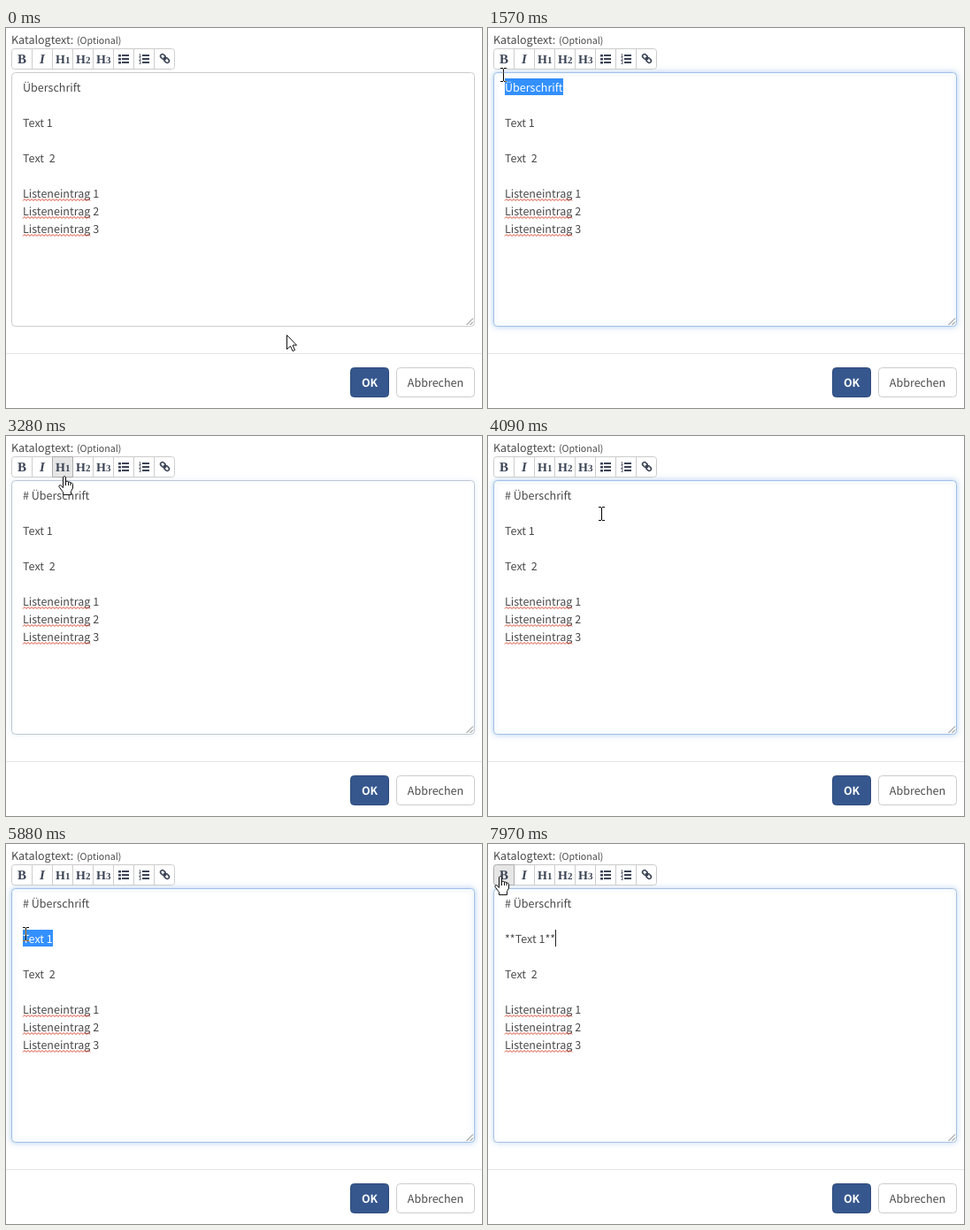
Animation of 538 by 430 pixels, one loop 8000 ms. Source, as an HTML page with a canvas:

```html
<!DOCTYPE html>
<html lang="de">
<head>
<meta charset="utf-8">
<title>Katalogtext</title>
<style>
html, body { margin: 0; width: 100%; height: 100%; overflow: hidden; background: #fff; }
canvas { display: block; }
</style>
</head>
<body>
<canvas id="stage" width="538" height="430"></canvas>
<script>
const ctx = document.getElementById('stage').getContext('2d');
const LOOP = 8000;
const SANS = '"Noto Sans CJK JP", "Noto Sans CJK SC", "Noto Sans", sans-serif';
const SERIF = '"Liberation Serif", serif';
const BODY = `12.54px ${SANS}`;
const INK = '#4a4a4a', ICON = '#3b4455';
const LEFT = 19;

// Pointer stops: time, x, y
const PATH = [
  [190, 317, 347], [980, 95, 69], [1360, 95, 69], [1600, 14, 52],
  [2000, 14, 52], [2550, 65, 44], [2730, 66, 45], [3820, 66, 45],
  [4090, 128, 88], [4350, 88, 107], [4600, 58, 102], [5410, 58, 102],
  [5880, 22, 102], [6380, 22, 102], [6890, 14, 36]
];

const ARROW = new Path2D('M.5 .5V16.5L4.5 13L7 18.5L9.5 17.5L7 12H11.5Z');
const HAND = new Path2D('M-1.5 1.5Q0 -.5 1.5 1.5V6.5Q3.3 5.5 4.5 7Q6 6.3 7 8Q9 7.6 9.5 9.5V14L7.5 17.5V21.5H-1.5V18.5L-6 12.5Q-6.5 10.5 -4.5 10.5L-1.5 13.5Z');
const KNUCKLES = new Path2D('M1.5 6V11M4.5 7V11M7 8V11');
const IBEAM = new Path2D('M-3 -8h3v1h1v-1h3v1h-3v14h3v1h-3v-1h-1v1h-3v-1h3v-14h-3Z');

const clamp = v => Math.max(0, Math.min(1, v));
const smooth = v => v * v * (3 - 2 * v);
const between = (t, a, b) => t >= a && t < b;
const mix = (a, b, k) => `rgb(${a.map((v, i) => Math.round(v + (b[i] - v) * k))})`;

function pointerAt(t) {
  const next = PATH.findIndex(p => p[0] > t);
  if (next === 0) return PATH[0].slice(1);
  if (next < 0) return PATH[PATH.length - 1].slice(1);
  const [t0, x0, y0] = PATH[next - 1], [t1, x1, y1] = PATH[next];
  const k = smooth((t - t0) / (t1 - t0));
  return [Math.round(x0 + (x1 - x0) * k), Math.round(y0 + (y1 - y0) * k)];
}

function text(str, x, y, font = BODY, color = INK, align = 'left') {
  ctx.font = font;
  ctx.fillStyle = color;
  ctx.textAlign = align;
  ctx.fillText(str, x, y);
}

function box(x, y, w, h, r, fill, stroke) {
  ctx.beginPath();
  ctx.roundRect(x + .5, y + .5, w - 1, h - 1, r);
  ctx.fillStyle = fill;
  ctx.fill();
  ctx.strokeStyle = stroke;
  ctx.lineWidth = 1;
  ctx.stroke();
}

function width(str) {
  ctx.font = BODY;
  return ctx.measureText(str).width;
}

function rows(draw) {
  for (let i = 0; i < 3; i++) draw(31 + i * 4, i);
}

function chainLink() {
  ctx.save();
  ctx.translate(179.5, 34.5);
  ctx.rotate(Math.PI / 4);
  ctx.strokeStyle = ICON;
  ctx.lineWidth = 1.6;
  ctx.beginPath();
  ctx.roundRect(-6, -2.2, 6, 4.4, 2.2);
  ctx.roundRect(0, -2.2, 6, 4.4, 2.2);
  ctx.moveTo(-2, 0);
  ctx.lineTo(2, 0);
  ctx.stroke();
  ctx.restore();
}

function toolbar(hover, pressed) {
  box(6, 23, 185, 24, 3, '#fff', '#ccc');
  ctx.fillStyle = '#ccc';
  for (let i = 1; i < 8; i++) ctx.fillRect(6 + i * 23, 23, 1, 24);
  if (hover >= 0) {
    box(6 + hover * 23, 23, 24, 24, hover ? 0 : [3, 0, 0, 3], pressed ? '#d4d4d4' : '#e6e6e6', '#adadad');
  }
  text('B', 18, 40, `bold 15px ${SERIF}`, ICON, 'center');
  text('I', 41, 40, `italic bold 15px ${SERIF}`, ICON, 'center');
  for (let i = 1; i < 4; i++) {
    text('H', 33 + i * 23, 40, `bold 14px ${SERIF}`, ICON);
    text(i, 44 + i * 23, 40, `bold 11px ${SERIF}`, ICON);
  }
  rows((y, i) => {
    ctx.fillStyle = ICON;
    ctx.fillRect(127, y - 1, 3, 2.5);
    ctx.fillRect(131, y - 1, 8, 2);
    ctx.fillRect(154, y - 1, 8, 2);
    text(i + 1, 150, y + 2, `bold 5px ${SANS}`, ICON);
  });
  chainLink();
}

function textarea(focus) {
  ctx.save();
  ctx.shadowColor = `rgba(110, 165, 225, ${.5 * focus})`;
  ctx.shadowBlur = 6;
  box(6, 50, 524, 288, 4, '#fff', mix([204, 204, 204], [160, 192, 230], focus));
  ctx.restore();
  ctx.strokeStyle = '#777';
  ctx.beginPath();
  ctx.moveTo(520.5, 336);
  ctx.lineTo(528, 328.5);
  ctx.moveTo(524.5, 336);
  ctx.lineTo(528, 332.5);
  ctx.stroke();
}

function squiggle(y, length) {
  ctx.beginPath();
  for (let x = 0; x <= length; x += 2) ctx.lineTo(LEFT + x, y + (x % 4 ? 0 : 2));
  ctx.strokeStyle = '#d8452f';
  ctx.lineWidth = 1;
  ctx.stroke();
}

// Selects from the nearest letter gap at pointer x to the end of the line
function selection(str, baseline, x, color) {
  const gaps = [...str, ''].map((_, i) => LEFT + width(str.slice(0, i)));
  const start = gaps.reduce((a, b) => Math.abs(b - x) < Math.abs(a - x) ? b : a);
  const end = gaps[gaps.length - 1];
  if (start >= end) return;
  ctx.save();
  ctx.beginPath();
  ctx.rect(Math.round(start), baseline - 15, Math.round(end) - Math.round(start), 19);
  ctx.clip();
  ctx.fillStyle = color;
  ctx.fillRect(0, baseline - 15, 538, 19);
  text(str, LEFT, baseline, BODY, '#fff');
  ctx.restore();
}

function caret(str, baseline) {
  ctx.fillStyle = '#222';
  ctx.fillRect(Math.round(LEFT + width(str)), baseline - 15, 1, 19);
}

function content(t, x) {
  const title = t < 3230 ? 'Überschrift' : '# Überschrift';
  const first = t < 7850 ? 'Text 1' : '**Text 1**';
  text(title, LEFT, 72);
  text(first, LEFT, 112);
  text('Text  2', LEFT, 152);
  for (let i = 0; i < 3; i++) {
    const y = 192 + i * 20;
    text('Listeneintrag ' + (i + 1), LEFT, y);
    squiggle(y + 1.5, width('Listeneintrag'));
  }
  const blue = '#3390ff', grey = '#c8c8c8';
  if (between(t, 1360, 3230)) selection(title, 72, t < 1600 ? x : 0, t < 3130 ? blue : grey);
  if (between(t, 5410, 7850)) selection(first, 112, t < 5880 ? x : 0, t < 7730 ? blue : grey);
  if (between(t, 1010, 1360)) caret(title, 72);
  if (between(t, 3330, 4790) && (t - 3330) % 1000 < 500) caret(title, 72);
  if (t >= 7930) caret(first, 112);
}

function footer() {
  ctx.fillStyle = '#e5e5e5';
  ctx.fillRect(0, 368, 538, 1);
  box(389, 384, 44, 34, 4, '#36578e', '#2d4b7d');
  text('OK', 411, 406, `bold 12.54px ${SANS}`, '#fff', 'center');
  box(441, 384, 89, 34, 4, '#fff', '#ccc');
  text('Abbrechen', 485.5, 406, BODY, INK, 'center');
}

function pointer(x, y, overButton) {
  ctx.save();
  ctx.translate(x, y);
  if (y >= 51 && y < 338) {
    ctx.globalCompositeOperation = 'difference';
    ctx.fillStyle = '#fff';
    ctx.fill(IBEAM);
  } else {
    const shape = overButton ? HAND : ARROW;
    ctx.fillStyle = '#fff';
    ctx.fill(shape);
    ctx.strokeStyle = '#111';
    ctx.lineWidth = 1;
    ctx.stroke(shape);
    if (overButton) ctx.stroke(KNUCKLES);
  }
  ctx.restore();
}

function draw(t) {
  const [x, y] = pointerAt(t);
  const hover = between(y, 23, 47) && between(x, 6, 190) ? Math.floor((x - 6) / 23) : -1;
  const pressed = between(t, 3130, 3230) || between(t, 7730, 7850);
  const ramp = start => clamp((t - start) / 150);
  const focus = ramp(1010) - ramp(3130) + ramp(3230) - ramp(7730) + ramp(7850);

  ctx.fillStyle = '#fff';
  ctx.fillRect(0, 0, 538, 430);
  text('Katalogtext:', 6, 18);
  text('(Optional)', 80, 18, `10.66px ${SANS}`);
  textarea(focus);
  toolbar(hover, pressed);
  content(t, x);
  footer();
  pointer(x, y, hover >= 0);
}

function frame() {
  draw(performance.now() % LOOP);
  requestAnimationFrame(frame);
}

ctx.textRendering = 'geometricPrecision';
frame();
</script>
</body>
</html>
```
